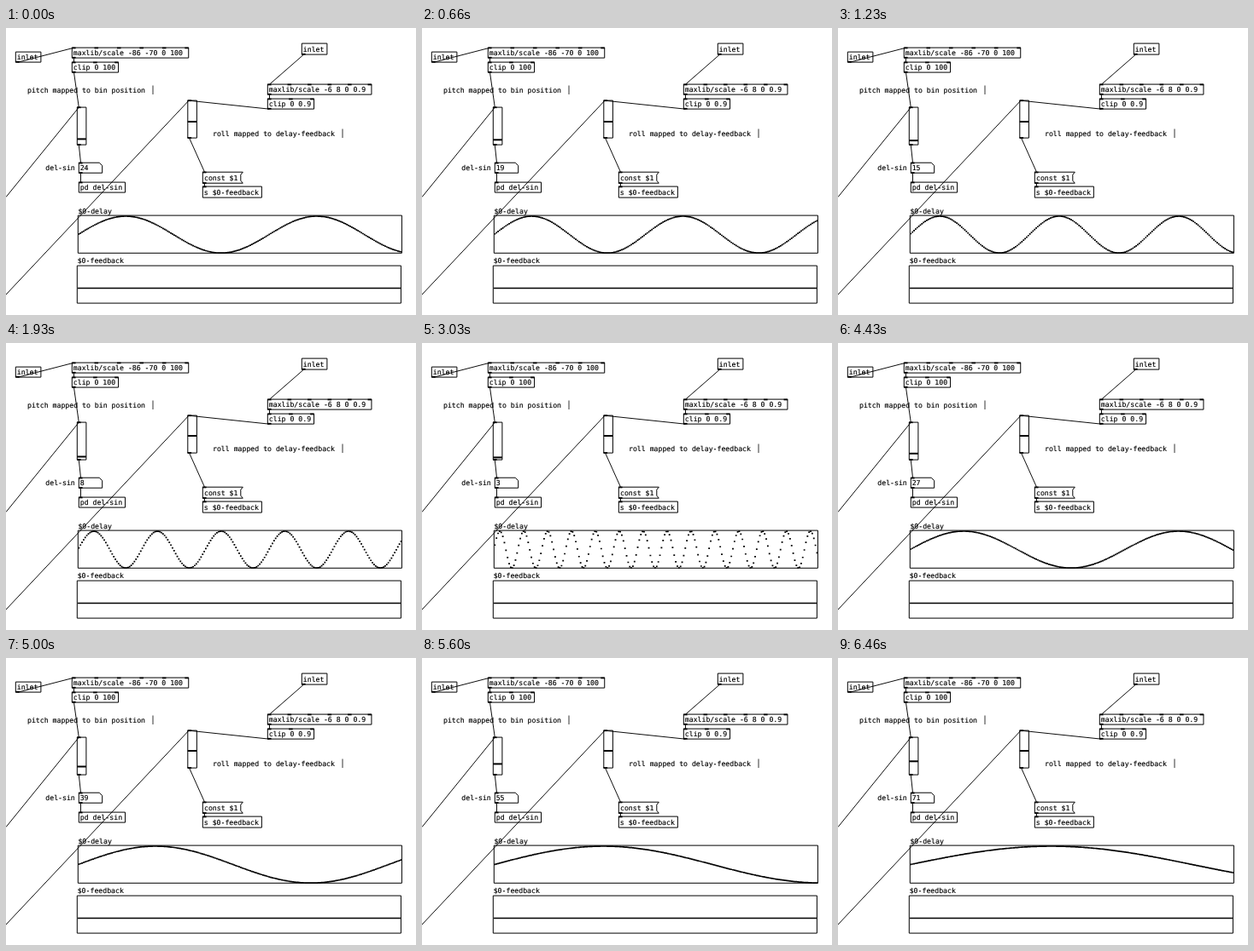
An HTML page for the animation above (6690 ms loop, 480 px wide and 337 px high).

```html
<!DOCTYPE html>
<html lang="en">
<head>
<meta charset="utf-8">
<title>Patch with sine delay</title>
<style>
  html, body { margin: 0; width: 100%; height: 100%; overflow: hidden; background: #fff; }
  svg { display: block; width: 480px; height: 337px; }
  text {
    font: 8.2px "DejaVu Sans Mono", "Liberation Mono", monospace;
    text-rendering: geometricPrecision;
    white-space: pre;
    stroke: #000;
    stroke-width: .15px;
  }
  path { fill: none; stroke: #000; }
</style>
</head>
<body>
<svg id="stage" viewBox="0 0 480 337"></svg>
<script>
const LOOP = 6690;
const stage = document.getElementById("stage");

function add(tag, attrs, text) {
  const el = document.createElementNS("http://www.w3.org/2000/svg", tag);
  for (const key in attrs) el.setAttribute(key, attrs[key]);
  if (text) el.textContent = text;
  return stage.appendChild(el);
}
const label = (x, y, text) => add("text", { x, y }, text);
const stroke = (d, width = 1) => add("path", { d, "stroke-width": width });
const wire = (x1, y1, x2, y2) => stroke(`M${x1} ${y1}L${x2} ${y2}`, .95);
const frame = (x, y, w, h) => stroke(`M${x + .3} ${y + .1}h${w - .4}v${h}h${.4 - w}z`);
const bar = (x, y) => stroke(`M${x} ${y}v10.5`, .8);

// Short thick marks for inlets and outlets, spread along an edge.
function ports(x, y, w, count) {
  for (let i = 0; i < count; i++) {
    const left = x + (count > 1 ? i * (w - 4.5) / (count - 1) : 0);
    stroke(`M${left} ${y}h4.6`, 1.7);
  }
}

// Text width sets the box width, as every character is equally wide.
function box(x, y, text, ins, outs, h = 12) {
  const w = text.length * 4.936 + (text.length > 20 ? 8.5 : 5.3);
  frame(x, y, w, h);
  ports(x, y + .5, w, ins);
  ports(x, y + h - .3, w, outs);
  label(x + 1.8, y + h - 3.1, text);
}

function slider(x, y) {
  frame(x, y, 11, 44);
  ports(x, y + .3, 11, 1);
  ports(x, y + 44, 11, 1);
  return stroke("", 2);
}

// Objects
box(11, 28, "inlet", 0, 1);
box(77, 23, "maxlib/scale -86 -70 0 100", 6, 1);
box(77, 40, "clip 0 100", 3, 1);
box(346, 18, "inlet", 0, 1, 13);
box(306, 66, "maxlib/scale -6 8 0 0.9", 6, 1);
box(306, 83, "clip 0 0.9", 3, 1);
box(85, 181, "pd del-sin", 1, 0);
box(230, 186, "s $0-feedback", 1, 0, 13);

// Message box and number box
stroke("M230.3 169.2H277.3L274.8 172.2V179.2L277.3 182.2H230.3Z");
ports(230, 169.5, 47, 1);
ports(230, 182, 47, 1);
label(232, 179, "const $1");
stroke("M85.3 158.2H109.3L112.7 161.7V170.2H85.3Z");
ports(85, 158.6, 28, 1);
ports(85, 170, 28, 1);
label(46.3, 167, "del-sin");
const number = label(86.7, 167, "24");

const pitchKnob = slider(83, 93);
const rollKnob = slider(212.5, 85);

// Wires
wire(13.5, 40.3, 79.5, 23.2);
wire(79.5, 35.2, 79.5, 40.2);
wire(79.5, 52.2, 85.3, 93.2);
wire(0, 198.5, 85.3, 93.2);
wire(85.3, 137.2, 87.5, 158.2);
wire(87.5, 170.2, 87.5, 181.2);
wire(0, 313, 214, 85.2);
wire(214.6, 129.2, 232.5, 169.2);
wire(232.5, 182.2, 232.5, 186.2);
wire(348.5, 31.2, 308.5, 66.2);
wire(308.5, 78.2, 308.5, 83.2);
wire(308.5, 95.2, 214, 85.2);

// Comments with their edge bars
label(25, 75.5, "pitch mapped to bin position");
bar(172, 67.5);
label(242, 127, "roll mapped to delay-feedback");
bar(394, 118.5);

// Arrays
label(84.4, 217.6, "$0-delay");
frame(84, 220, 379.5, 44.2);
label(83.7, 275.8, "$0-feedback");
frame(83, 279, 379.5, 44);
stroke("M84 305.5H462.5", 1.6);
const wave = stroke("", 1.7);

function wavePath(value) {
  const count = 204, dx = 379 / count, period = value * 9.32;
  let d = "";
  for (let i = 0; i < count; i++) {
    const angle = 2 * Math.PI * (i + .6) * dx / period;
    const y = 242.6 - 21.6 * Math.sin(angle);
    d += `M${(84.4 + i * dx).toFixed(2)} ${y.toFixed(2)}h${dx.toFixed(2)}`;
  }
  return d;
}

// Key points of the hand-made fall: [ms, value]
const fall = [
  [0, 24], [200, 23], [230, 22], [460, 21], [730, 18], [1000, 17],
  [1230, 15], [1460, 12], [1600, 11], [1930, 8], [2400, 4], [2700, 2]
];
const ROLL_TIME = 1760, TURN = 3030, RISE = 3500, TOP = 6300, END = 6460;
const RISE_TICK = 83.5, RISE_STEP = 2.05;

function fallAt(t) {
  const next = fall.findIndex(key => key[0] > t);
  if (next < 0) return fall.at(-1)[1];
  const [t0, v0] = fall[next - 1], [t1, v1] = fall[next];
  return Math.ceil(v0 + (v1 - v0) * (t - t0) / (t1 - t0));
}

function delayAt(t) {
  if (t < TURN) return fallAt(t);
  if (t < RISE) return 3;
  if (t < TOP) return Math.round(4 + RISE_STEP * Math.floor((t - RISE) / RISE_TICK));
  return t < END ? 73 : 71;
}

let shown;
function draw(now) {
  const t = now % LOOP;
  const value = delayAt(t);
  rollKnob.setAttribute("d", `M212.8 ${t < ROLL_TIME ? 110 : 109}h10.6`);
  if (value !== shown) {
    shown = value;
    number.textContent = value;
    pitchKnob.setAttribute("d", `M83.3 ${(135 - value * .193).toFixed(1)}h10.6`);
    wave.setAttribute("d", wavePath(value));
  }
}

const start = performance.now();
function tick() {
  draw(performance.now() - start);
  requestAnimationFrame(tick);
}
tick();
</script>
</body>
</html>
```
